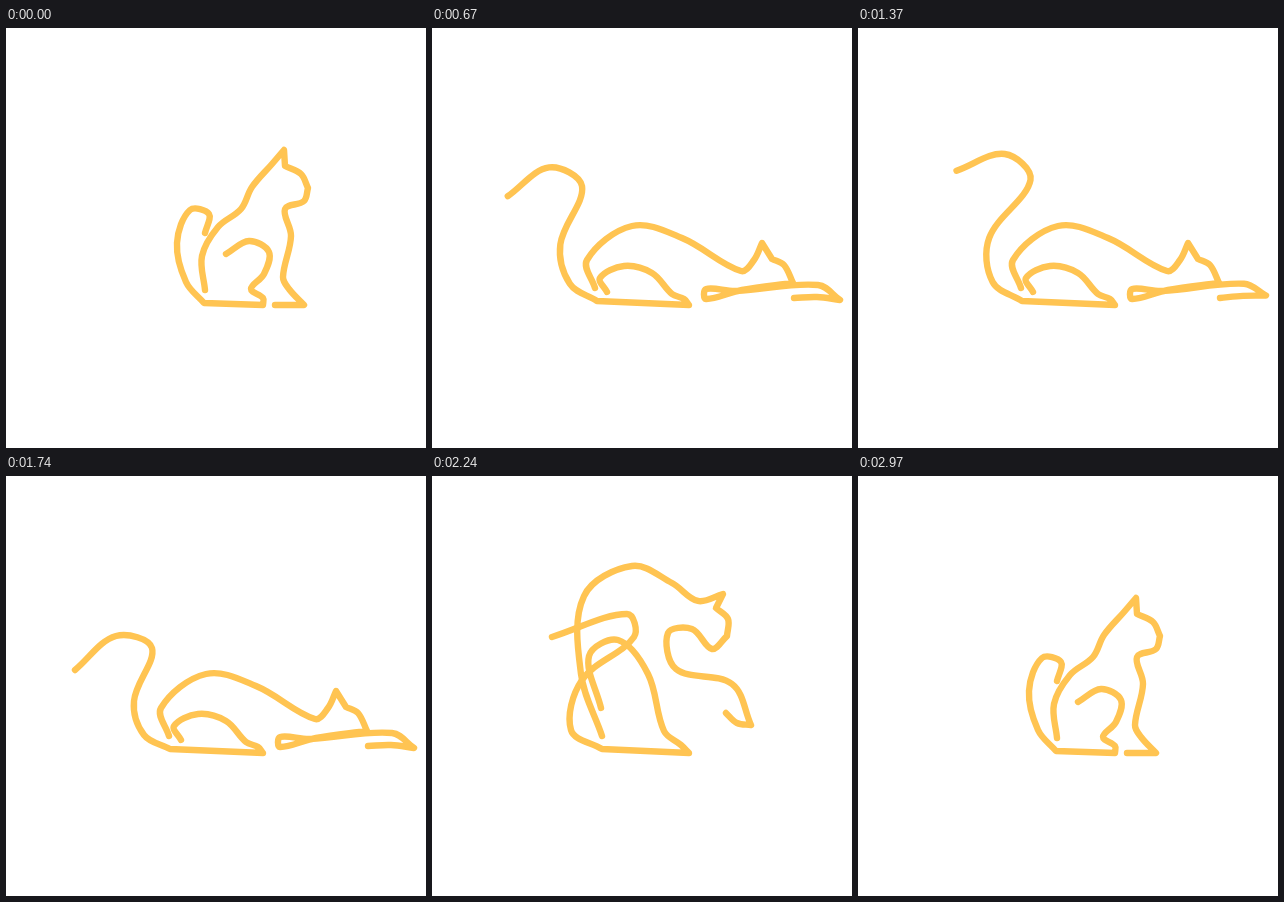
An HTML page for the animation above (4.03 s loop, 420x420 px).

```html
<!DOCTYPE html>
<html lang="en">
<head>
<meta charset="utf-8">
<title>Stretching cat</title>
<style>
  html, body { margin: 0; width: 100%; height: 100%; overflow: hidden; background: #fff; }
  svg { display: block; width: 100%; height: 100%; }
  path { fill: none; stroke: #ffc452; stroke-width: 6.4; stroke-linecap: round; stroke-linejoin: round; }
</style>
</head>
<body>
<svg viewBox="0 0 420 420"><path id="front"/><path id="hind"/></svg>
<script>
const LOOP = 4030;
const GROUND = 277;
const FOOT = [257, GROUND];

// A pose is a chain of smooth curves through key points; "/" marks a corner.
const parse = text => text.split('/').map(curve =>
  curve.trim().split(/\s+/).map(point => point.split(',').map(Number)));

// Back / ear / face / chest and foreleg / paw / thigh.
const sit = parse(`199,262 196,228 212,199 235,181 246,159 266,136 278,122 / 279,138 /
  295,146 302,160 / 298,173 279,181 285,208 277,249 283,261 298,277 / 284,277 269,277 /
  257,270 245,261 258,246 263,224 243,213 220,226`);
const crouch = parse(`180,261 179,230 200,198 232,190 267,198 282,174 285,160 / 296,172 /
  312,179 321,190 / 311,207 290,217 266,237 276,247 337,261 349,273 / 335,272 320,273 /
  250,268 242,257 235,233 213,219 191,234 195,248`);
const lie = parse(`163,260 155,232 200,198 250,210 309,243 322,232 330,215 / 340,231 /
  352,237 361,255 / 310,262 274,271 274,261 304,263 386,257 408,272 / 385,269 362,270 /
  252,271 240,266 220,245 192,238 168,250 175,264`);
const arch = parse(`170,260 149,198 152,120 200,90 240,107 266,125 291,118 / 284,132 /
  296,143 295,160 / 280,173 260,153 236,157 244,193 300,208 319,249 / 305,247 294,237 /
  249,269 232,255 216,198 186,164 157,180 169,232`);

// Tails run from tip to root.
const curled = parse('199,205 203,186 184,182 171,215 180,254 198,275');
const hooked = parse('167,155 139,157 132,185 158,222 171,252 174,273');
const flicked = parse('117,161 103,157 113,168 152,182 163,220 157,273');
const draped = parse('69,194 110,160 146,172 128,225 138,259 164,273');
const looped = parse('120,161 195,138 202,161 150,204 139,254 170,273');
const waved = parse('155,175 115,211 122,242 166,231 183,264 198,275');

const reshape = (pose, move) => pose.map(curve => curve.map(move));
const stretch = (pose, k) => reshape(pose, ([x, y]) => [x, GROUND - (GROUND - y) * k]);

// Raises whatever lies close to the toe.
const liftToe = (pose, [toeX], height) => reshape(pose, ([x, y]) =>
  [x, y - height * Math.exp(-(((x - toeX) / 20) ** 2))]);

// Turns a tail about its root, more towards the tip, and scales its reach.
function sway([tail], degrees, reach) {
  const last = tail.length - 1;
  const [rootX, rootY] = tail[last];
  return [tail.map(([x, y], i) => {
    const turn = degrees * Math.PI / 180 * (1 - i / last);
    const dx = (x - rootX) * reach, dy = (y - rootY) * reach;
    return [rootX + dx * Math.cos(turn) - dy * Math.sin(turn),
            rootY + dx * Math.sin(turn) + dy * Math.cos(turn)];
  })];
}

const lift = liftToe(lie, lie[3].at(-1), 18);

const bodyKeys = [
  [30, sit], [150, stretch(sit, 1.2)], [370, crouch], [620, lie], [850, lie],
  [1030, lift], [1300, lie], [1520, lift], [1740, lie], [1970, lie],
  [2240, arch], [2370, stretch(sit, 1.37)], [2560, sit]
];
const tailKeys = [
  [30, curled], [370, hooked], [740, sway(draped, 7, 1.15)], [1030, flicked],
  [1300, sway(draped, 25, 1.2)], [1740, draped], [1970, draped], [2240, looped],
  [2350, sway(draped, 0, 1.5)], [2520, waved], [2600, waved], [2970, curled]
];

const mix = (a, b, k) => Array.isArray(a) ? a.map((v, i) => mix(v, b[i], k)) : a + (b - a) * k;

function poseAt(keys, time) {
  const next = keys.findIndex(([at]) => at > time);
  if (next < 1) return keys[0][1];
  const [start, from] = keys[next - 1];
  const [end, to] = keys[next];
  const u = (time - start) / (end - start);
  return mix(from, to, u * u * (3 - 2 * u));
}

const distance = (a, b) => Math.hypot(b[0] - a[0], b[1] - a[1]);

// Bézier handle at b towards c, parallel to the chord from a to c.
function handle(a, b, c) {
  const near = distance(b, c);
  const k = 0.36 * near / (distance(a, b) + near || 1);
  return b.map((v, n) => v + (c[n] - a[n]) * k);
}

function spline(points) {
  const at = i => points[Math.min(Math.max(i, 0), points.length - 1)];
  return points.slice(1).map((end, i) =>
    `C${handle(at(i - 1), at(i), end)} ${handle(at(i + 2), end, at(i))} ${end}`).join('');
}

const chain = curves => 'M' + curves[0][0] + curves.map((curve, i) =>
  spline(i ? [curves[i - 1].at(-1), ...curve] : curve)).join('');

const front = document.getElementById('front');
const hind = document.getElementById('hind');
const began = performance.now();

function draw() {
  const time = (performance.now() - began) % LOOP;
  const body = poseAt(bodyKeys, time);
  const thigh = body.at(-1);
  front.setAttribute('d', chain(body.slice(0, -1)));
  hind.setAttribute('d', chain([...poseAt(tailKeys, time), [FOOT], thigh]));
  requestAnimationFrame(draw);
}
draw();
</script>
</body>
</html>
```
